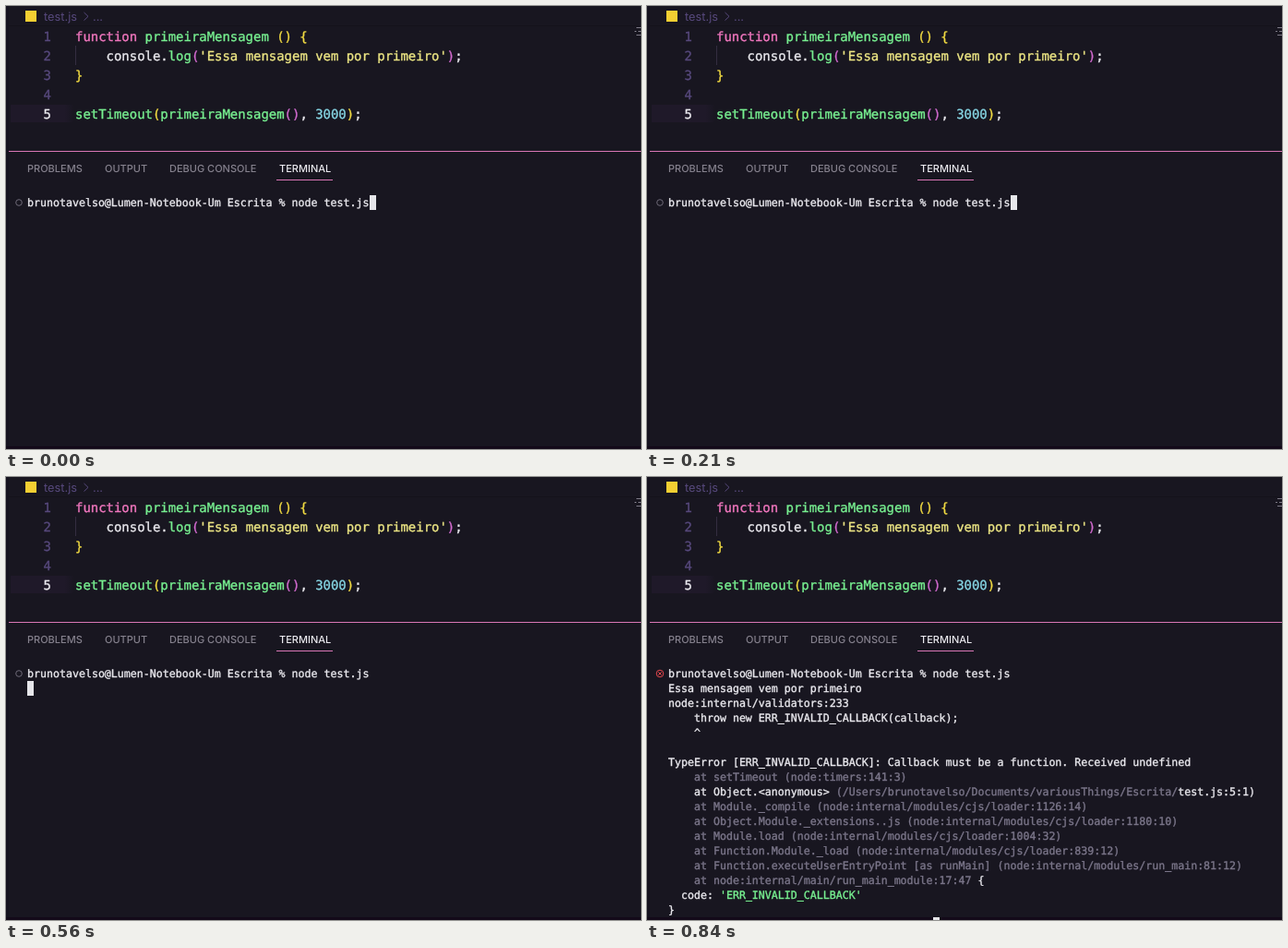
An HTML page that plays this animation: 688x480 px, repeating every 2.52 s.

```html
<!DOCTYPE html>
<html lang="pt">
<head>
<meta charset="utf-8">
<title>Terminal</title>
<style>
  html, body { margin: 0; width: 100%; height: 100%; overflow: hidden; background: #181620; }
  svg { display: block; }
  text { white-space: pre; text-rendering: geometricPrecision; }
  tspan { fill: currentColor; }
  .code, .term { stroke-width: .35px; }
  .code tspan, .term tspan { stroke: currentColor; }
  .code { font: 13.953px "DejaVu Sans Mono", monospace; }
  .term { font: 11.627px "DejaVu Sans Mono", monospace; }
  .tab { font: 500 11px Inter, sans-serif; }
  .crumb { font: 12.8px Inter, sans-serif; }
</style>
</head>
<body>
<svg id="stage" width="688" height="480" viewBox="0 0 688 480">
  <defs>
    <linearGradient id="active">
      <stop offset="0" stop-color="#1f1929"/>
      <stop offset=".85" stop-color="#1f1929"/>
      <stop offset="1" stop-color="#181620"/>
    </linearGradient>
  </defs>
  <rect width="688" height="480" fill="#181620"/>
  <rect width="3" height="480" fill="#15121f"/>
  <rect y="477" width="688" height="3" fill="#130a19"/>
  <path d="M3 21.5h685" stroke="#14121b"/>
  <rect x="21" y="5" width="12" height="12" fill="#f3cf32"/>
  <path d="M84.5 7l4.5 4.3-4.5 4.3" fill="none" stroke="#57497d"/>
  <path d="M683 23.5h5M681 27.5h2M685 27.5h3M683 31.5h5" stroke="#7d7986"/>
  <rect x="5" y="107" width="69" height="19" fill="url(#active)"/>
  <path d="M75.5 43v21" stroke="#332d40"/>
  <path d="M3 157.5h685" stroke="#d876b5"/>
  <path d="M293 188.5h61" stroke="#d876b5"/>
  <circle id="idle" cx="14" cy="213" r="3.3" fill="none" stroke="#6d6977"/>
  <g id="failed" fill="none" stroke="#e5484d">
    <circle cx="14" cy="213" r="3.8"/>
    <path d="M12.3 211.3l3.4 3.4m0-3.4l-3.4 3.4"/>
  </g>
  <g id="editor"></g>
  <g id="prompt"></g>
  <g id="output"></g>
  <rect id="cursor" width="7" height="16" fill="#e6e6ea"/>
</svg>
<script>
const LOOP = 2520, ENTER = 560, CRASH = 700;
const white = '#ebeaef', gray = '#7b768a', purple = '#57497d', pink = '#f277bf',
      green = '#78f191', yellow = '#eee784', gold = '#f3dc42', orchid = '#d36bd0', cyan = '#86d5e3';
const $ = id => document.getElementById(id);
const make = (tag, parent) =>
  parent.appendChild(document.createElementNS('http://www.w3.org/2000/svg', tag));

// Runs alternate colour and text.
function write(parent, style, x, y, ...runs) {
  const text = make('text', $(parent));
  text.setAttribute('class', style);
  text.setAttribute('x', x);
  text.setAttribute('y', y);
  for (let i = 0; i < runs.length; i += 2) {
    const span = make('tspan', text);
    span.setAttribute('color', runs[i]);
    span.textContent = runs[i + 1];
  }
}
const shell = (parent, row, ...runs) => write(parent, 'term', 23, 217 + row * 16, ...runs);

write('editor', 'crumb', 41, 15.5, purple, 'test.js');
write('editor', 'crumb', 94, 15.5, purple, '...');

[
  [pink, 'function ', green, 'primeiraMensagem ', gold, '() {'],
  [white, '    console.', green, 'log', orchid, '(', yellow, "'Essa mensagem vem por primeiro'",
   orchid, ')', white, ';'],
  [gold, '}'],
  [],
  [green, 'setTimeout', gold, '(', green, 'primeiraMensagem', orchid, '()', white, ', ',
   cyan, '3000', gold, ')', white, ';']
].forEach((runs, i) => {
  const y = 37.6 + i * 21;
  write('editor', 'code', 40.6, y, i === 4 ? white : purple, String(i + 1));
  write('editor', 'code', 75, y, ...runs);
});

[[23, 'PROBLEMS'], [107, 'OUTPUT'], [177, 'DEBUG CONSOLE'], [296, 'TERMINAL']].forEach(([x, label], i) =>
  write('editor', 'tab', x, 179.5, i === 3 ? white : '#85818d', label));

shell('prompt', 0, white, 'brunotavelso@Lumen-Notebook-Um Escrita % node test.js');

[
  [white, 'Essa mensagem vem por primeiro'],
  [white, 'node:internal/validators:233'],
  [white, '    throw new ERR_INVALID_CALLBACK(callback);'],
  [white, '    ^'],
  [],
  [white, 'TypeError [ERR_INVALID_CALLBACK]: Callback must be a function. Received undefined'],
  [gray, '    at setTimeout (node:timers:141:3)'],
  [white, '    at Object.<anonymous> ', gray, '(/Users/brunotavelso/Documents/variousThings/Escrita/',
   white, 'test.js:5:1)'],
  [gray, '    at Module._compile (node:internal/modules/cjs/loader:1126:14)'],
  [gray, '    at Object.Module._extensions..js (node:internal/modules/cjs/loader:1180:10)'],
  [gray, '    at Module.load (node:internal/modules/cjs/loader:1004:32)'],
  [gray, '    at Function.Module._load (node:internal/modules/cjs/loader:839:12)'],
  [gray, '    at Function.executeUserEntryPoint [as runMain] (node:internal/modules/run_main:81:12)'],
  [gray, '    at node:internal/main/run_main_module:17:47', white, ' {'],
  [white, '  code: ', green, "'ERR_INVALID_CALLBACK'"],
  [white, '}']
].forEach((runs, i) => shell('output', i + 1, ...runs));

const show = (id, on) => $(id).setAttribute('visibility', on ? 'visible' : 'hidden');

function draw() {
  const t = performance.now() % LOOP;
  const crashed = t >= CRASH;
  const [column, row] = crashed ? [41, 17] : t >= ENTER ? [0, 1] : [53, 0];
  show('idle', !crashed);
  show('failed', crashed);
  show('output', crashed);
  $('cursor').setAttribute('x', 23 + column * 7);
  $('cursor').setAttribute('y', 205 + row * 16);
  requestAnimationFrame(draw);
}
draw();
</script>
</body>
</html>
```
